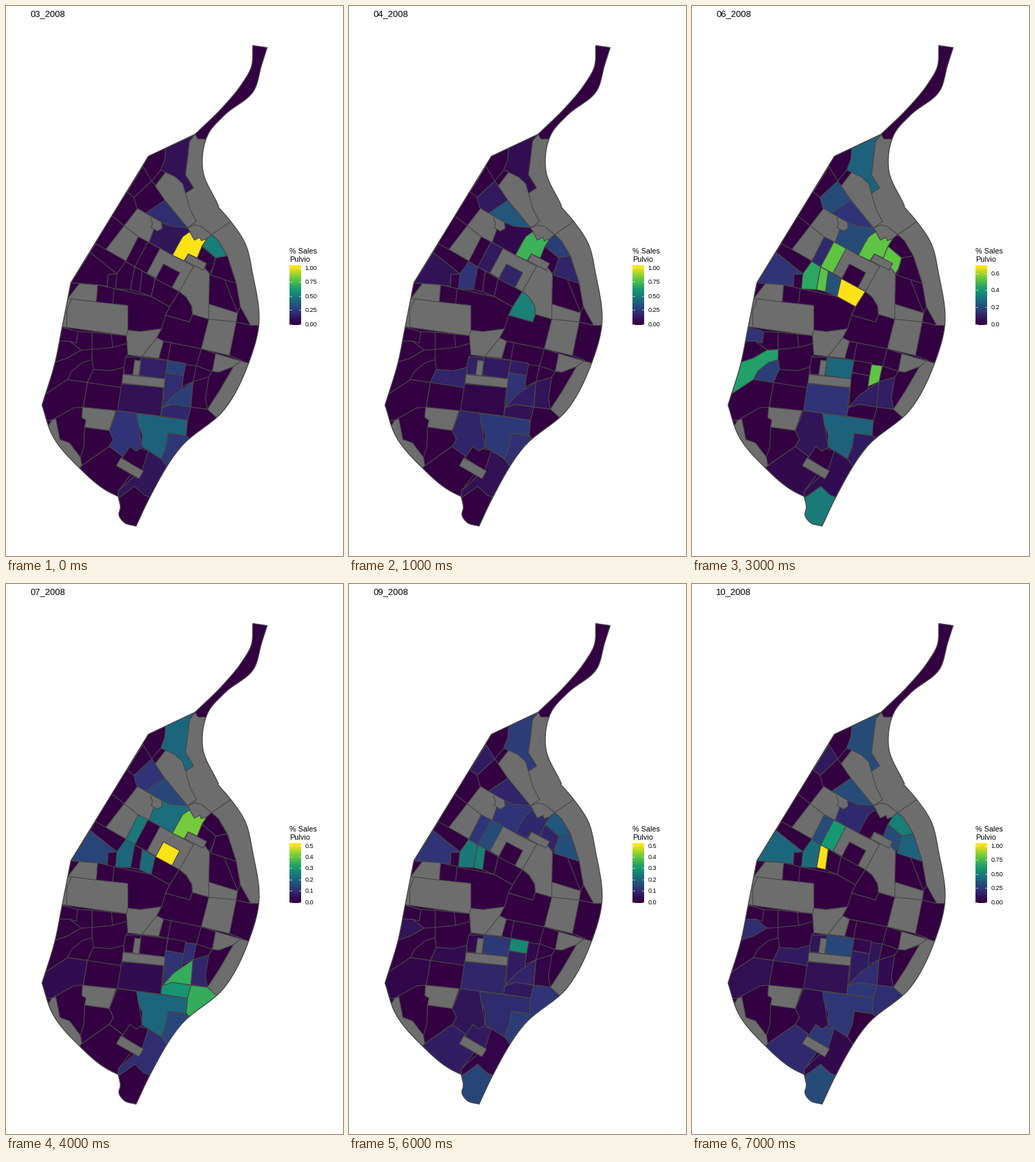
A matplotlib script for the animation above (8000 ms loop, 491 by 800 pixels).

```python
import matplotlib.pyplot as plt
import numpy as np
from matplotlib.animation import FuncAnimation
from matplotlib.colors import LinearSegmentedColormap
from matplotlib.patches import Polygon

W, H, DPI = 491, 800, 100
PX = 72 / DPI  # points per pixel
GAMMA = 1.22
plt.rcParams["font.family"] = "Liberation Sans"

MONTHS = ["mar", "apr", "may", "jun", "jul", "aug", "sep", "oct"]
BLENDED = {"apr", "sep"}  # taken halfway between their neighbours
# top of the colour scale and label step where they are not 1 and 0.25
SCALES = {"jun": (2 / 3, .2), "jul": (.5, .1), "sep": (.5, .1)}

RAMP = LinearSegmentedColormap.from_list(
    "ramp", plt.cm.viridis(np.linspace(0, 1, 6)))


def tone(v):
    return RAMP(v)[..., :3] ** GAMMA if np.ndim(v) else \
        tuple(c ** GAMMA for c in RAMP(float(v))[:3])


GREY, EDGE, DARK = (.427,) * 3, (.277,) * 3, tone(0)

fig = plt.figure(figsize=(W / DPI, H / DPI), dpi=DPI, facecolor="white")
ax = fig.add_axes([0, 0, 1, 1])


def curve(*flat, steps=8):
    """Smooth path through key points, spaced by chord length."""
    p = np.reshape(flat, (-1, 2)).astype(float)
    t = np.r_[0, np.cumsum(np.hypot(*np.diff(p, axis=0).T))]
    m = np.gradient(p, t, axis=0)
    s = np.linspace(0, 1, steps, endpoint=False)[:, None]
    path = []
    for a, b, ma, mb, d in zip(p, p[1:], m, m[1:], np.diff(t)):
        path.append(a * (1 + 2 * s) * (1 - s) ** 2 + b * s * s * (3 - 2 * s)
                    + d * s * (1 - s) * (ma * (1 - s) - mb * s))
    return np.vstack(path + [p[-1:]])


outline = np.vstack([
    curve(359, 57, 380, 60),
    curve(380, 60, 372, 85, 361, 122, 318, 158, 295, 184, 286, 237, 309, 290),
    curve(308, 291, 327, 313, 348, 345, 359, 390, 368, 462, 353, 519,
          318, 586, 255, 640, 209, 714, 189, 756),
    curve(189, 756, 172, 751, 164, 739, 166, 730, 163, 713),
    curve(163, 713, 147, 705, 106, 671, 67, 624, 52, 580),
    curve(52, 580, 71, 518, 81, 468, 94, 402),
    curve(207, 218, 275, 186),
    curve(275, 186, 315, 147, 343, 113, 357, 88, 359, 57),
])
city = Polygon(outline, fc=DARK, ec="none")
ax.add_patch(city)
ax.add_patch(Polygon(outline, fc="none", ec=EDGE, lw=1.3 * PX, zorder=4))

# Districts are painted in order: later ones cover the rough sides of
# earlier ones, and the city outline trims whatever runs over it.
live = []


def shape(points, color, closed=True):
    patch = Polygon(np.reshape(points, (-1, 2)), closed=closed, fc=color,
                    ec=EDGE, lw=1.15 * PX, joinstyle="round", zorder=2)
    ax.add_patch(patch)
    patch.set_clip_path(city)
    return patch


def block(x, y, w, h, turn):
    """Rectangle around a centre, turned by degrees."""
    c, s = np.cos(np.radians(turn)), np.sin(np.radians(turn))
    corners = np.array([[-w, -h], [w, -h], [w, h], [-w, h]]) / 2
    return corners @ [[c, s], [-s, c]] + [x, y]


def grey(*flat):
    shape(flat, GREY)


def dark(*flat):
    shape(flat, DARK)


def line(*flat):
    shape(flat, "none", closed=False)


def area(points, **shares):
    """District coloured by its share of the month's maximum."""
    live.append((shape(points, DARK), shares))


# grey north with the dark middle and east on it
grey(275, 186, 279, 193, 400, 194, 400, 464, 356, 464, 335, 459, 325, 508,
     284, 498, 229, 487, 222, 512, 177, 507, 175, 479, 60, 463)
dark(130, 345, 252, 415, 262, 423, 270, 436, 271, 448, 295, 455, 284, 498,
     229, 487, 219, 482, 226, 469, 195, 473, 177, 471, 177, 435, 131, 430,
     133, 405, 94, 402)
dark(299, 332, 309, 341, 322, 363, 335, 403, 341, 437, 356, 464, 335, 459,
     337, 446, 295, 433, 296, 389, 285, 349)

# borders between districts of one colour
line(261, 272, 268, 296, 277, 313, 264, 322)
line(154, 305, 192, 335)
line(264, 322, 275, 318, 284, 320, 299, 332, 327, 313)
line(210, 307, 213, 316, 211, 322, 215, 324)
line(242, 362, 273, 378, 252, 415)
line(91, 425, 131, 430)
line(95, 426, 88, 442, 88, 467)
line(175, 479, 177, 471)
line(219, 482, 197, 510)
line(295, 433, 295, 455, 335, 459)
line(318, 398, 337, 446, 341, 437)
line(133, 405, 159, 411, 211, 422, 238, 437, 232, 449, 226, 469)
line(232, 449, 267, 459, 271, 448)
line(157, 411, 155, 432)
line(122, 358, 161, 389, 148, 390, 147, 407)
line(240, 488, 235, 515, 222, 512)
line(284, 498, 277, 523, 300, 531, 295, 539)
line(284, 498, 305, 505)
line(104, 473, 125, 474, 175, 479)
line(125, 474, 125, 499, 155, 496, 177, 490)
line(153, 477, 155, 496)
line(177, 507, 174, 510)
line(118, 547, 112, 583)
line(110, 668, 150, 640, 156, 630, 150, 617)
line(114, 612, 113, 640, 108, 656)

# north
area([232, 206, 275, 186, 267, 196, 264, 222, 261, 245, 273, 264, 261, 272,
      257, 258, 246, 248, 225, 238, 231, 222],
     mar=.08, may=.05, jun=.38, jul=.4, aug=.18, oct=.3)
area([199, 233, 212, 254, 186, 278, 176, 270], aug=.13, oct=.11)
area([212, 254, 231, 282, 203, 301, 190, 293, 186, 278],
     may=.22, jun=.3, jul=.2)
area([231, 282, 264, 322, 240, 320, 226, 314, 203, 301],
     mar=.18, may=.5, jun=.2, jul=.28, oct=.3)
line(212, 254, 225, 238)
area([226, 314, 240, 320, 264, 322, 268, 328, 242, 362, 208, 343, 215, 324,
      220, 327, 227, 323], mar=.1, jun=.3, jul=.43, aug=.25, oct=.17)
area([292, 338, 299, 332, 309, 341, 322, 363, 305, 366, 285, 349],
     mar=.49, aug=.2, oct=.49)
area([285, 349, 305, 366, 301, 380, 296, 389, 278, 366], jun=.78, oct=.3)
area([305, 366, 322, 363, 335, 403, 298, 391], may=.3, aug=.25, oct=.38)
area([267, 328, 274, 340, 282, 336, 284, 341, 292, 338, 285, 349, 278, 366,
      265, 360, 259, 370, 242, 362, 250, 347, 257, 335],
     mar=1, may=.4, jun=.78, jul=.82, aug=.33)
shape(block(276, 372, 30, 11, 27), GREY)

# centre
area([94, 402, 122, 358, 161, 389, 148, 390, 147, 407, 133, 405],
     may=.17, jun=.2, jul=.27, oct=.4)
area(block(190, 357, 16, 41, 27), jun=.17, jul=.47, aug=.12, oct=.3)
area(block(205.5, 365.5, 20, 41, 28), may=.22, jun=.78, oct=.6)
area([174, 371, 187, 379, 181, 412, 159, 411, 161, 389],
     may=.4, jun=.66, jul=.4, aug=.52, oct=.42)
area([198, 385, 217, 396, 211, 422, 194, 415], jun=.33, jul=.42)
area([187, 379, 198, 385, 194, 415, 181, 412], jun=.77, oct=1)
area(block(235, 392, 27, 25, 28), may=.3, jul=1)
area([217, 396, 252, 415, 238, 437, 211, 422], jun=1)
area([252, 415, 262, 423, 270, 436, 271, 448, 267, 459, 232, 449, 238, 437],
     may=1)

# south-west
area([75, 465, 104, 473, 102, 490, 92, 487, 70, 487], jun=.2)
area([70, 487, 92, 487, 109, 500, 88, 512, 65, 520], oct=.18)
area([109, 500, 125, 499, 125, 514, 89, 543, 50, 569, 60, 521, 88, 512],
     jun=.63)
area([125, 514, 127, 528, 118, 547, 89, 543, 95, 531, 111, 518], jun=.25)
area([127, 528, 152, 530, 171, 525, 170, 555, 118, 547], may=.3, oct=.12)
area([174, 510, 197, 510, 188, 536, 172, 535, 171, 525], may=.28, oct=.1)
area([40, 575, 89, 543, 118, 547, 112, 583, 98, 584, 66, 602, 40, 602],
     jul=.06, oct=.07)
area([196, 510, 235, 515, 231, 542, 194, 537],
     mar=.14, may=.09, jun=.4, aug=.17, oct=.28)
shape(block(190, 526, 9, 22, 8), GREY)
area([168, 549, 229, 554, 225, 596, 162, 588],
     mar=.08, jun=.2, jul=.06, aug=.24, oct=.08)
shape(block(200, 545, 62, 13, 6), GREY)
grey(111, 583, 160, 588, 150, 617, 114, 612, 116, 602, 110, 598)
grey(66, 602, 72, 600, 78, 630, 92, 635, 108, 656, 110, 668, 100, 690,
     50, 630)

# south
area([150, 640, 190, 670, 163, 705, 163, 725, 90, 690, 110, 668],
     jun=.05, aug=.08, oct=.17)
area([207, 646, 245, 671, 209, 718, 163, 718, 163, 705, 190, 680],
     mar=.1, may=.06, jun=.06, jul=.18, oct=.05)
area([180, 640, 207, 646, 197, 677, 168, 656], oct=.22)
area([162, 588, 190, 592, 198, 641, 189, 647, 180, 640, 170, 655, 150, 640,
      156, 630, 150, 617], mar=.2, may=.11, jun=.1, aug=.14, oct=.05)
area([190, 592, 264, 602, 262, 624, 236, 621, 233, 640, 226, 658, 198, 641,
      198, 623, 192, 607],
     mar=.38, may=.08, jun=.38, jul=.4, aug=.13, oct=.22)
area([236, 621, 265, 625, 280, 650, 238, 675, 226, 658, 233, 640],
     mar=.22, may=.17, jun=.12, jul=.28, aug=.48)
shape(block(180, 672, 38, 13, 30), GREY)
area([163, 715, 172, 709, 187, 698, 201, 711, 209, 714, 215, 765, 150, 765],
     jun=.48, aug=.25, oct=.3)

# south-east
grey(305, 505, 370, 524, 380, 560, 302, 600, 293, 586, 310, 560, 331, 524,
     310, 532, 300, 531)
line(331, 524, 343, 515, 325, 508)
area([232, 533, 258, 537, 256, 560, 228, 582],
     mar=.18, may=.22, jul=.2, aug=.13, oct=.12)
area([260, 521, 277, 523, 272, 546, 256, 553], jun=.78, jul=.18, oct=.1)
area([272, 546, 269, 583, 242, 579, 227, 584, 244, 565],
     mar=.25, jun=.13, jul=.68, aug=.12, oct=.18)
area([272, 546, 295, 539, 290, 570, 293, 586, 269, 583],
     may=.18, jun=.13, jul=.16, oct=.06)
area([227, 584, 242, 579, 269, 583, 264, 602, 225, 596],
     mar=.16, jul=.58, oct=.22)
area([269, 583, 293, 586, 330, 620, 268, 630, 262, 624, 264, 602],
     jul=.68, aug=.22, oct=.18)
area(block(247, 526, 26, 18, 10), mar=.25, aug=1, oct=.05)

# colour scale
LEFT, RIGHT, TOP, BOTTOM, ZERO, SPAN = 412.5, 429.5, 377.5, 464, 462, 82


def write(x, y, size, text=""):
    return ax.text(x, y, text, size=size * PX, color="black", va="baseline")


ys = np.linspace(TOP, BOTTOM, 173)
bar = tone(np.clip((ZERO - ys) / SPAN, 0, 1))[:, None]
ax.imshow(bar, extent=(LEFT, RIGHT, BOTTOM, TOP), aspect="auto", zorder=2)
ax.set_xlim(-.5, W - .5)
ax.set_ylim(H - .5, -.5)
ax.axis("off")

write(412.5, 359.5, 10.9, "% Sales")
write(412.5, 371.2, 10.9, "Pulvio")
title = write(34.7, 14.6, 13.1)
labels = [write(435, 0, 9.1) for _ in range(6)]
marks = [ax.plot([], [], color="white", lw=.6 * PX, zorder=3)[0]
         for _ in labels]


def share(known, i):
    if MONTHS[i] in BLENDED:
        return (share(known, i - 1) + share(known, i + 1)) / 2
    return known.get(MONTHS[i], 0)


def draw(i):
    title.set_text(f"{i + 3:02d}_2008")
    for patch, known in live:
        patch.set_facecolor(tone(share(known, i)))
    top, step = SCALES.get(MONTHS[i], (1, .25))
    digits = 2 if step == .25 else 1
    for k, (label, mark) in enumerate(zip(labels, marks)):
        value = k * step
        y = ZERO - SPAN * value / top
        label.set_text(f"{value:.{digits}f}")
        label.set_y(y + 3.2)
        mark.set_data([LEFT, LEFT + 3.4, np.nan, RIGHT - 3.4, RIGHT], [y] * 5)
        for part in (label, mark):
            part.set_visible(value <= top + 1e-6)
    return []


anim = FuncAnimation(fig, draw, frames=len(MONTHS), interval=1000,
                     repeat=True, repeat_delay=0, blit=False)
plt.show()
```
